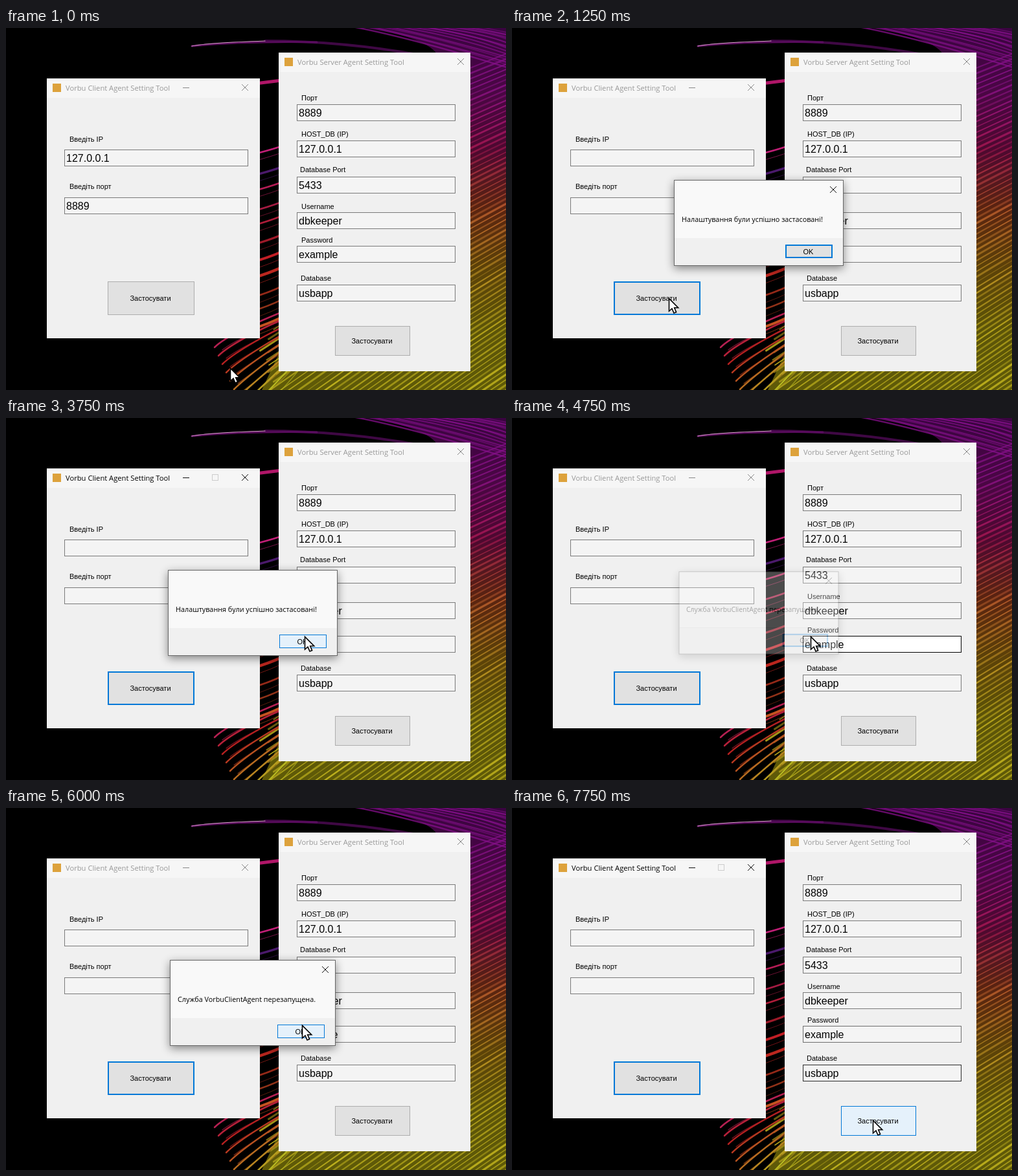
An HTML page with a canvas for the animation above (8000 ms loop, 772 by 560 pixels).

```html
<!DOCTYPE html>
<html lang="uk">
<head>
<meta charset="utf-8">
<title>Service settings</title>
<style>
html, body { margin: 0; width: 772px; height: 560px; overflow: hidden; background: #000; }
canvas, svg { position: absolute; left: 0; top: 0; display: block; }
svg { cursor: default; user-select: none; }
text { font: 11px "Liberation Sans", Arial, sans-serif; fill: #000; white-space: pre; }
.title, .msg { font: 11.2px "Open Sans", "Noto Sans", sans-serif; }
.msg { font-size: 10.8px; }
.mid { text-anchor: middle; }
.value { font-size: 16px; }
.field { fill: #f4f4f4; stroke: #7a7a7a; }
.btn { fill: #e1e1e1; stroke: #adadad; }
.btn .inner { stroke: none; }
.btn.focus { stroke: #0078d7; }
.btn.focus .inner { stroke: inherit; }
.btn.hover { fill: #e5f1fb; stroke: #0078d7; }
.glyph { fill: none; stroke: #111; }
.off .title { fill: #999; }
.off .glyph { stroke: #888; }
.off .max { display: none; }
.max { fill: none; stroke: #ccc; }
.dialog { transform-origin: 380.5px 301px; filter: drop-shadow(0 4px 7px rgba(0, 0, 0, .45)); }
#client:not(.off) ~ .dialog .glyph { display: none; }
</style>
</head>
<body>
<canvas id="wall" width="772" height="560"></canvas>
<svg id="ui" width="772" height="560" viewBox="0 0 772 560"></svg>
<script>
// ---- wallpaper: glowing feather strands on black ----
const ctx = document.getElementById('wall').getContext('2d');
let seed = 11;
const rnd = () => (seed = (seed * 16807) % 2147483647) / 2147483647;
const unit = v => Math.min(1, Math.max(0, v));

function ramp(stops) {
  const g = ctx.createLinearGradient(0, 0, 0, 560);
  stops.forEach((c, i) => g.addColorStop(i / (stops.length - 1), c));
  return g;
}

function strand(x0, y0, cx, cy, x1, y1, color, width, alpha = 1) {
  ctx.globalAlpha = alpha;
  ctx.strokeStyle = color;
  ctx.lineWidth = width;
  ctx.beginPath();
  ctx.moveTo(x0, y0);
  ctx.quadraticCurveTo(cx, cy, x1, y1);
  ctx.stroke();
}

function paintWall() {
  const dark = ramp(['#3a0440', '#4a0645', '#4d0830', '#5a2410', '#5c4208', '#5c5408', '#5f5a08']);
  const light = ramp(['#82108a', '#8c1288', '#a5164f', '#b3582a', '#b0851f', '#b5a31a', '#bdb01c']);
  ctx.fillStyle = '#000';
  ctx.fillRect(0, 0, 772, 560);

  ctx.fillStyle = dark;
  ctx.beginPath();
  ctx.moveTo(560, 0);
  ctx.quadraticCurveTo(700, 25, 660, 70);
  ctx.quadraticCurveTo(500, 330, 395, 560);
  ctx.lineTo(772, 560);
  ctx.lineTo(772, 0);
  ctx.fill();

  ctx.lineCap = 'round';
  for (let e = 40; e < 810; e += 8) {
    const k = 0.4 + 0.35 * unit(e / 480);
    const len = 150 + unit((e + 40) / 300) * 200 + rnd() * 30;
    strand(772, e, 772 - len / 2, e + len * k * 0.45, 772 - len, e + len * k,
      light, 1.2 + rnd() * 2, 0.5 + rnd() * 0.5);
  }

  for (let i = 0; i < 15; i++) {
    const x = 535 + i * 14;
    strand(x, -2, x + 90, 6 + rnd() * 12, 790, 66 - i * 4, '#86108c', 1.2 + rnd() * 1.5, 0.4 + rnd() * 0.4);
  }
  strand(287, 28, 370, 20, 480, 22, '#6d1070', 3, 0.8);
  strand(400, 20, 520, 20, 640, 42, '#5a0c62', 4, 0.7);
  strand(287, 28, 310, 23, 400, 20, '#d9a0cc', 1.2);

  strand(370, 88, 400, 84, 450, 78, '#b01668', 5);
  for (let i = 0; i < 11; i++) {
    const y = 188 + i * 27 + rnd() * 8;
    const color = i === 1 ? '#4b1a6c' : `hsl(${328 + i * 5} 72% ${32 + rnd() * 14}%)`;
    strand(365, y + 10, 400, y + 4, 450, y - 14 - i, color, 2.5 + rnd() * 2);
    strand(380, y + 18, 405, y + 12, 450, y - 4 - i, color, 1, 0.6);
  }

  for (let i = 0; i < 9; i++) {
    const x = 322 + i * 6, y = 494 + i * 13;
    const color = `hsl(${340 + i * 10} 70% 42%)`;
    strand(x, y, x + 24, y - 24, 455, y - 66 - i * 3, color, 2.5);
    strand(x + 12, y + 4, x + 40, y - 18, 460, y - 54 - i * 3, color, 1.2, 0.7);
  }
  ctx.globalAlpha = 1;
}

// ---- interface ----
const label = (x, y, s, cls = '') => `<text x="${x}" y="${y}" class="${cls}">${s}</text>`;
const fill = (x, y, w, h, color) => `<rect x="${x}" y="${y}" width="${w}" height="${h}" fill="${color}"/>`;
const box = (x, y, w, h, cls, id = '') =>
  `<rect id="${id}" class="${cls}" x="${x + 0.5}" y="${y + 0.5}" width="${w - 1}" height="${h - 1}"/>`;
const cross = (x, y) => `<path class="glyph" d="M${x - 5} ${y - 5}l10 10m0-10l-10 10"/>`;

const field = (x, y, w, id, value) =>
  box(x, y, w, 26, 'field', id) + label(x + 3, y + 19, value, 'value');

const button = (x, y, w, h, id, s, cls = 'btn') =>
  `<g id="${id}" class="${cls}">${box(x, y, w, h, '')}${box(x + 1, y + 1, w - 2, h - 2, 'inner')}</g>` +
  label(x + w / 2 - 1, y + h / 2 + 4, s, 'mid');

const frame = (x, y, w, h, s) =>
  fill(x, y, w, h, '#f0f0f0') + fill(x, y, w, 30, '#f6f6f6') +
  fill(x + 9, y + 8, 13, 13, '#dda23c') + label(x + 29, y + 19, s, 'title');

const dialog = (id, x, w, s) =>
  `<g id="${id}" class="dialog">` +
  fill(x, 235, w, 133, '#666') + fill(x + 1, 236, w - 2, 89, '#f9f9f9') +
  fill(x + 1, 325, w - 2, 42, '#f0f0f0') +
  cross(x + w - 16, 250) + label(x + 12, 300, s, 'msg') +
  button(x + w - 90, 335, 73, 21, id + 'Ok', 'OK', 'btn focus') + '</g>';

const rows = [
  [456, 112, 118, 'Порт', '8889'],
  [456, 168, 174, 'HOST_DB (IP)', '127.0.0.1'],
  [454, 223, 230, 'Database Port', '5433'],
  [456, 280, 285, 'Username', 'dbkeeper'],
  [456, 332, 337, 'Password', 'example'],
  [455, 391, 397, 'Database', 'usbapp']
];

document.getElementById('ui').innerHTML =
  '<g id="client">' + frame(63, 78, 329, 402, 'Vorbu Client Agent Setting Tool') +
  '<path class="glyph" d="M273 92.5h10"/><rect class="max" x="318.5" y="87.5" width="9" height="9"/>' +
  cross(369, 92) +
  label(98, 176, 'Введіть IP') + label(98, 249, 'Введіть порт') +
  field(90, 188, 284, '', '<tspan class="entry">127.0.0.1</tspan>') +
  field(90, 262, 284, '', '<tspan class="entry">8889</tspan>') +
  button(157, 392, 134, 52, 'apply', 'Застосувати') + '</g>' +
  '<g class="off">' + frame(421, 38, 296, 493, 'Vorbu Server Agent Setting Tool') + cross(702, 52) +
  rows.map(([x, y, top, name, value]) => label(x, y, name) + field(449, top, 245, name, value)).join('') +
  button(508, 461, 116, 46, 'save', 'Застосувати') + '</g>' +
  dialog('done', 250, 262, 'Налаштування були успішно застасовані!') +
  dialog('restart', 253, 256, 'Служба VorbuClientAgent перезапущена.') +
  '<path id="arrow" d="M.5 .5V20L5 16 8 23 11.6 21.5 8.7 14.8H14.7Z" fill="#fff" stroke="#000" stroke-width="1.6"/>' +
  '<path id="beam" d="M.5-8V8" stroke="#fff"/>';

const $ = id => document.getElementById(id);
const entries = document.querySelectorAll('.entry');

// ---- timeline: changes per 250 ms tick, each kept until replaced ----
const TICK = 250, COUNT = 32;
const GHOST = 0.3;
const changes = {
  0: { arrow: [346, 526], beam: null, done: 0, restart: 0, ok: false, filled: true,
       active: false, apply: '', save: '', pass: 0, base: 0 },
  1: { arrow: [318, 534] },
  2: { arrow: [268, 468] },
  3: { arrow: [242, 418], apply: 'hover' },
  4: { filled: false, apply: 'focus', done: GHOST },
  5: { done: 1 },
  6: { arrow: [246, 424] },
  7: { arrow: [276, 414] },
  8: { arrow: [345, 381] },
  9: { arrow: [401, 355] },
  10: { arrow: [387, 358] },
  11: { arrow: [424, 350] },
  12: { arrow: [456, 340], ok: true },
  13: { arrow: [461, 338] },
  15: { active: true },
  16: { done: GHOST },
  17: { done: 0, arrow: null, beam: [471, 350], pass: 0.6 },
  18: { pass: 1 },
  19: { active: false, restart: GHOST, arrow: [461, 338], beam: null, ok: false },
  20: { restart: 1, pass: 0.5 },
  21: { ok: true, pass: 0 },
  22: { arrow: [460, 338] },
  23: { arrow: [458, 337] },
  24: { arrow: [457, 336] },
  26: { active: true },
  27: { restart: GHOST, arrow: null, beam: [471, 350], pass: 0.3 },
  28: { restart: 0, pass: 0.65 },
  29: { beam: [498, 354], pass: 1 },
  30: { beam: [535, 411], pass: 0.4, base: 1 },
  31: { beam: null, arrow: [557, 483], save: 'hover', pass: 0.1, base: 0.65 }
};

const states = [];
for (let i = 0; i < COUNT; i++) states.push({ ...states[i - 1], ...changes[i] });

function place(el, pos) {
  el.style.display = pos ? '' : 'none';
  if (pos) el.setAttribute('transform', `translate(${pos})`);
}

function fade(id, v) {
  const s = $(id).style;
  s.display = v ? '' : 'none';
  s.opacity = v;
  s.transform = v < 1 ? 'scale(.965)' : 'none';
}

function glow(id, v) {
  const c = Math.round(122 * (1 - v));
  $(id).style.stroke = `rgb(${c},${c},${c})`;
  $(id).style.fill = v === 1 ? '#fff' : '#f4f4f4';
}

function show(s) {
  place($('arrow'), s.arrow);
  place($('beam'), s.beam);
  fade('done', s.done);
  fade('restart', s.restart);
  for (const id of ['doneOk', 'restartOk']) $(id).setAttribute('class', 'btn ' + (s.ok ? 'hover' : 'focus'));
  $('apply').setAttribute('class', 'btn ' + s.apply);
  $('save').setAttribute('class', 'btn ' + s.save);
  $('client').setAttribute('class', s.active ? '' : 'off');
  entries.forEach(e => { e.style.display = s.filled ? '' : 'none'; });
  glow('Password', s.pass);
  glow('Database', s.base);
}

let last = -1;
const start = performance.now();
function run() {
  const i = Math.floor((performance.now() - start) / TICK) % COUNT;
  if (i !== last) show(states[last = i]);
  requestAnimationFrame(run);
}

paintWall();
run();
</script>
</body>
</html>
```
